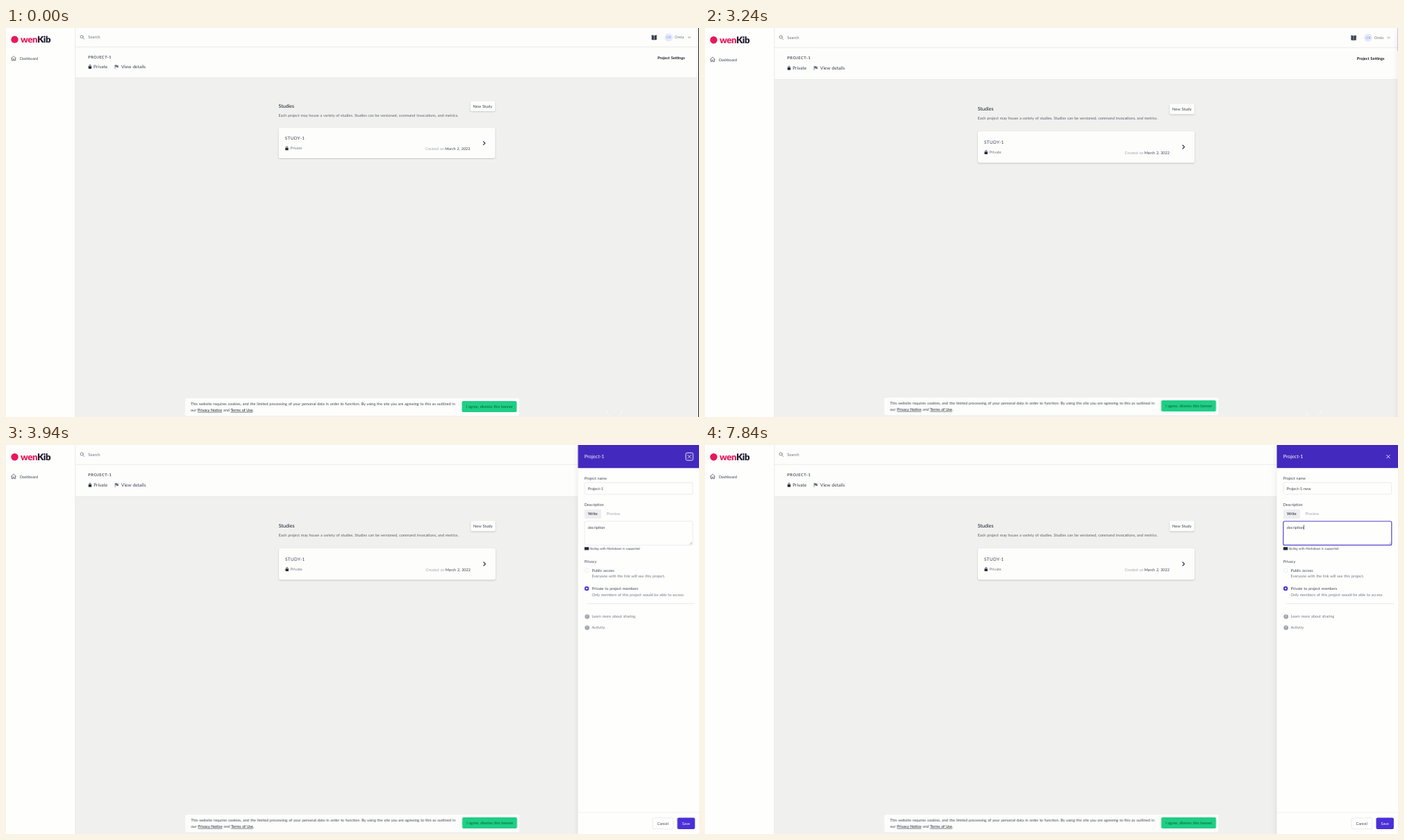
Write an HTML page that moves like this. It is 998 px wide and 561 px high and loops after 8000 ms.

```html
<!DOCTYPE html>
<html lang="en">
<head>
<meta charset="utf-8">
<title>Project settings</title>
<style>
  html, body { margin: 0; width: 100%; height: 100%; overflow: hidden; background: #f0f0ee; }
  svg { display: block; width: 998px; height: 561px; }
  text { font: 5.5px Lato, "Open Sans", sans-serif; word-spacing: .07em; fill: #374151; text-rendering: geometricPrecision; white-space: pre; }
  .dark { fill: #111827; }
  .soft { fill: #6b7280; }
  .pale { fill: #9ca3af; }
  .white { fill: #fff; }
  .bold { font-weight: 700; }
  .h1 { font-size: 7.1px; }
  .h2 { font-size: 6.55px; }
  .under { text-decoration: underline; text-decoration-thickness: .4px; }
  .card { fill: #fdfdfb; filter: drop-shadow(0 1px .8px rgba(0, 0, 0, .18)); }
  .field { fill: #fefefd; stroke: #dddde6; stroke-width: .6; }
  .focus { fill: none; stroke: #5646cf; stroke-width: 1.2; }
  .line { fill: none; stroke-linecap: round; stroke-linejoin: round; }

  .step { animation: 8s step-end infinite; }
  #page { animation-name: settle; }
  #banner { animation-name: settle-banner; }
  #edge { animation-name: edge; }
  #panel { animation: slide 8s linear infinite; }
  #ring { animation-name: ring; }
  #name-focus { animation-name: name-focus; }
  #name-caret { animation-name: caret; }
  #text-focus { animation-name: text-focus; }
  #preview { animation-name: hover; }
  #k1 { animation-name: k1; }
  #k2 { animation-name: k2; }
  #k3 { animation-name: k3; }
  #k4 { animation-name: k4; }

  @keyframes settle {
    0% { transform: scale(.9993, .968); }
    .5% { transform: scale(.9997, .984); }
    2.125%, 100% { transform: scale(1, 1); }
  }
  @keyframes settle-banner {
    0% { transform: translate(-.5px, 1px); }
    .5% { transform: translate(-.2px, .5px); }
    2.125%, 100% { transform: translate(0, 0); }
  }
  @keyframes edge { 0% { opacity: 1; } .5%, 100% { opacity: 0; } }
  @keyframes slide {
    0% { transform: translateX(200px); animation-timing-function: step-end; }
    40.5% { transform: translateX(174.5px); }
    40.94% { transform: translateX(174.5px); animation-timing-function: cubic-bezier(.4, 0, .2, 1); }
    49.69%, 100% { transform: translateX(0); }
  }
  @keyframes ring { 0% { opacity: 1; } 63.375%, 100% { opacity: 0; } }
  @keyframes name-focus { 0% { opacity: 0; } 63.375% { opacity: 1; } 96.75%, 100% { opacity: 0; } }
  @keyframes text-focus { 0% { opacity: 0; } 96.75%, 100% { opacity: 1; } }
  @keyframes hover { 0% { fill: #9ca3af; } 90.125% { fill: #4b5563; } 93.125%, 100% { fill: #9ca3af; } }
  @keyframes caret {
    0% { opacity: 0; transform: translateX(0); }
    64% { opacity: 1; transform: translateX(0); }
    70.125% { opacity: 0; transform: translateX(0); }
    75.125% { opacity: 1; transform: translateX(1.9px); }
    78.375% { opacity: 1; transform: translateX(5px); }
    80.5% { opacity: 1; transform: translateX(7.9px); }
    83% { opacity: 1; transform: translateX(12.2px); }
    90.125%, 100% { opacity: 0; transform: translateX(12.2px); }
  }
  @keyframes k1 { 0% { fill: transparent; } 75.125%, 100% { fill: #374151; } }
  @keyframes k2 { 0% { fill: transparent; } 78.375%, 100% { fill: #374151; } }
  @keyframes k3 { 0% { fill: transparent; } 80.5%, 100% { fill: #374151; } }
  @keyframes k4 { 0% { fill: transparent; } 83%, 100% { fill: #374151; } }
</style>
</head>
<body>
<svg viewBox="0 0 998 561">
  <defs>
    <g id="lock">
      <path class="line" d="M-1.2 -.5V-1.6a1.2 1.2 0 0 1 2.4 0V-.5" stroke="#1f2937" stroke-width=".8"/>
      <rect x="-2.2" y="-.7" width="4.4" height="3.5" rx=".6" fill="#1f2937"/>
    </g>
    <g id="help">
      <circle r="3.3" fill="#9ca3af"/>
      <text y="1.7" text-anchor="middle" class="white bold" style="font-size:4.8px">?</text>
    </g>
  </defs>

  <rect width="998" height="561" fill="#f0f0ee"/>
  <path class="line" d="M865 552a11 10 0 0 0 22 0" stroke="#fff" opacity=".5"/>

  <g id="page" class="step">
    <rect x="100" width="910" height="74" fill="#fdfdfb"/>
    <path d="M100 28.2H1010" stroke="#e2e4e6" stroke-width=".7"/>
    <path d="M100 74.2H1010" stroke="#e5e6e7" stroke-width=".6"/>
    <rect width="99.8" height="600" fill="#fefefc"/>
    <path d="M99.8 0V600" stroke="#e2e3e5" stroke-width=".7"/>

    <circle cx="12.5" cy="17.2" r="5.2" fill="#e8175d"/>
    <text x="21" y="22" style="font-size:13.2px;font-weight:900;letter-spacing:-.4px;fill:#e8175d">wen<tspan fill="#1d1b2e">Kib</tspan></text>
    <path class="line" d="M7.6 45.3 11 41.8l3.4 3.5M8.5 44.6v4h1.7v-2.4h1.6v2.4h1.7v-4" stroke="#4b5563" stroke-width=".75"/>
    <text x="20" y="47.5">Dashboard</text>

    <g class="line" stroke="#6b7280" stroke-width=".8">
      <circle cx="109.2" cy="13" r="2.1"/>
      <path d="M110.9 14.7 112.8 16.6"/>
    </g>
    <text x="118.3" y="16" class="soft" style="font-size:5.9px">Search</text>
    <path d="M930.6 10.7 933.6 11.3V17.7L930.6 17.2ZM937.6 10.7 934.4 11.3V17.7L937.6 17.2Z" fill="#374151" stroke="#374151" stroke-width=".4"/>
    <circle cx="955" cy="14" r="6" fill="#e6ebfb"/>
    <text x="955" y="15.9" text-anchor="middle" style="font-size:5px;fill:#8199e0">OR</text>
    <text x="963.8" y="16" class="soft">Orela</text>
    <path class="line" d="M982.9 13.2 984.6 14.9 986.3 13.2" stroke="#6b7280" stroke-width=".8"/>

    <text x="118.3" y="45" class="bold" style="font-size:5.7px;letter-spacing:.5px;fill:#4b5563">PROJECT-1</text>
    <use href="#lock" x="121" y="57.8"/>
    <text x="126.2" y="60" class="h2">Private</text>
    <path d="M157.1 55.2v5.4" class="line" stroke="#6b7280" stroke-width=".7"/>
    <path d="M157.3 55h2.4l.4.7h2.3l-.9 1.6.9 1.6h-2.6l-.4-.7h-2.1Z" fill="#6b7280"/>
    <text x="166" y="60" class="h2">View details</text>
    <text x="938.8" y="46" class="dark bold" style="font-size:5.6px">Project Settings</text>

    <text x="392.8" y="118.5" class="dark h1">Studies</text>
    <text x="392.8" y="132.2" style="fill:#535b69">Each project may house a variety of studies. Studies can be versioned, command invocations, and metrics.</text>
    <rect x="669.3" y="109.3" width="35.5" height="15" rx="1.8" class="card"/>
    <text x="673" y="118.8" style="font-size:5.7px">New Study</text>

    <rect x="393" y="149" width="312" height="45.3" rx="2.3" class="card"/>
    <text x="402" y="166.5" style="font-size:6.3px;letter-spacing:.4px">STUDY-1</text>
    <use href="#lock" x="404.7" y="179.3"/>
    <text x="409.8" y="181.3" class="soft">Private</text>
    <text x="604.5" y="181.7" class="pale">Created on</text>
    <text x="632.8" y="181.7">March 2, 2022</text>
    <path class="line" d="M687.9 169 690.4 171.5 687.9 174" stroke="#1f2937" stroke-width="1.1"/>
  </g>

  <g id="banner" class="step">
    <rect x="258.3" y="533" width="481" height="25.2" rx="2" fill="#fdfdfb"/>
    <text x="266.5" y="543">This website requires cookies, and the limited processing of your personal data in order to function. By using the site you are agreeing to this as outlined in</text>
    <text x="266.5" y="551.8">our <tspan class="under dark">Privacy Notice</tspan> and <tspan class="under dark">Terms of Use</tspan>.</text>
    <rect x="657" y="537" width="79" height="16" rx="2" fill="#1fce85"/>
    <text x="663.2" y="547.3" style="font-size:5.6px;fill:#0c5a3b">I agree, dismiss this banner</text>
  </g>
  <rect id="edge" class="step" x="997" width="1" height="561" fill="#1f2021"/>

  <g id="panel">
    <rect x="823.5" width="175.5" height="561" fill="#fefefc" style="filter:drop-shadow(0 4px 4px rgba(0,0,0,.1))"/>
    <rect x="823.5" width="175.5" height="33.2" fill="#4329bd"/>
    <text x="832.7" y="18.9" class="white h1">Project-1</text>
    <path class="line" d="M981.6 14.3l4.8 4.8m0-4.8-4.8 4.8" stroke="#e9e7fb" stroke-width=".9"/>
    <rect id="ring" class="step" x="978.8" y="11.3" width="10.4" height="10.8" rx="1.8" fill="none" stroke="#fff" stroke-width=".9"/>

    <text x="832.7" y="50">Project name</text>
    <rect x="832.8" y="54.2" width="156" height="16.7" rx="2" class="field"/>
    <rect id="name-focus" class="step focus" x="832.8" y="54.2" width="156" height="16.7" rx="2"/>
    <text x="837.8" y="64.6">Project-1<tspan id="k1" class="step">-</tspan><tspan id="k2" class="step">n</tspan><tspan id="k3" class="step">e</tspan><tspan id="k4" class="step">w</tspan></text>
    <rect id="name-caret" class="step" x="860.6" y="59.3" width=".6" height="6.6" fill="#111827"/>

    <text x="832.7" y="87.5">Description</text>
    <rect x="832.8" y="93" width="24.3" height="13" rx="1.6" fill="#eeeef0"/>
    <text x="838" y="101.3" class="dark">Write</text>
    <text id="preview" class="step" x="864.7" y="101.3" style="font-size:5.6px">Preview</text>
    <rect x="832.8" y="110" width="156" height="34.4" rx="2" class="field"/>
    <path class="line" d="M984.8 143l2.7-2.7m-1 2.7 1-1" stroke="#6b7280" stroke-width=".5"/>
    <text x="837.8" y="120.5">decription</text>
    <g id="text-focus" class="step">
      <rect class="focus" x="832.8" y="110" width="156" height="34.4" rx="2"/>
      <rect x="862.2" y="115.2" width=".6" height="6.8" fill="#111827"/>
    </g>
    <rect x="832.8" y="147.2" width="6.4" height="4.2" rx=".5" fill="#1f2937"/>
    <text x="840.4" y="150.9" style="font-size:4.5px">Styling with Markdown is supported</text>

    <text x="832.7" y="170.2">Privacy</text>
    <circle cx="836.3" cy="181" r="2.9" fill="#fff" stroke="#e2e3ec" stroke-width=".6"/>
    <text x="843.6" y="182.7">Public access</text>
    <text x="843.6" y="191.3" class="soft">Everyone with the link will see this project.</text>
    <circle cx="836.1" cy="206.9" r="2.2" fill="#fff" stroke="#4a30d0" stroke-width="2"/>
    <text x="843.6" y="208.8">Private to project members</text>
    <text x="843.6" y="217.5" class="soft">Only members of this project would be able to access.</text>
    <path d="M836.7 228.7H992" stroke="#e2e3f3" stroke-width=".8"/>

    <use href="#help" x="836.7" y="247.5"/>
    <text x="843.6" y="249.4" class="soft">Learn more about sharing</text>
    <use href="#help" x="836.7" y="263.5"/>
    <text x="843.6" y="265.4" class="soft">Activity</text>

    <path d="M823.5 530H998" stroke="#ebebed" stroke-width=".7"/>
    <rect x="931" y="537.8" width="29.8" height="16" rx="2" class="field"/>
    <text x="945.7" y="547.8" text-anchor="middle">Cancel</text>
    <rect x="966.5" y="537.5" width="25.4" height="16.4" rx="2" fill="#4a30d6"/>
    <text x="979.2" y="547.8" text-anchor="middle" class="white">Save</text>
  </g>
</svg>
</body>
</html>
```
